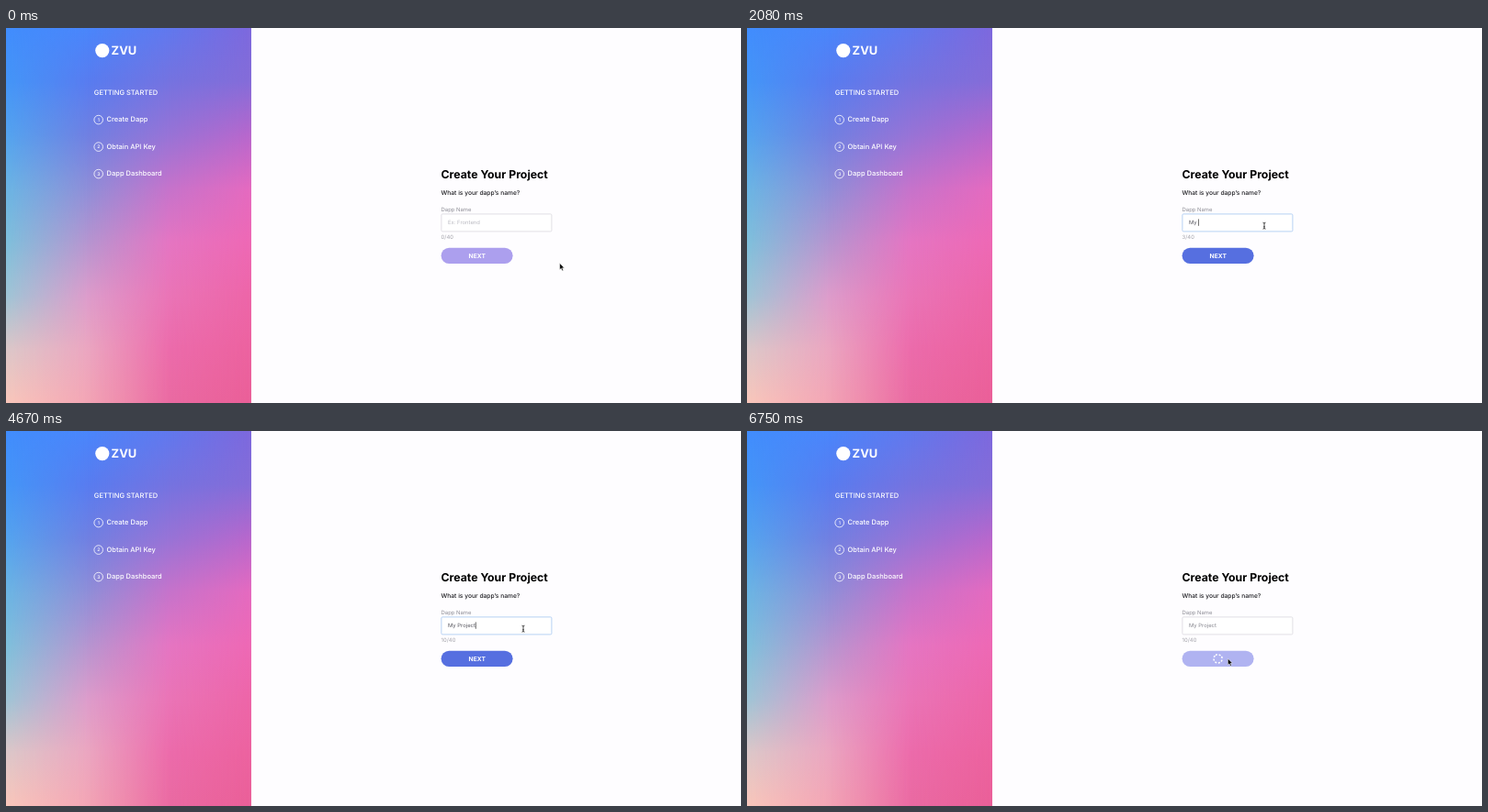
An HTML page for the animation above (6830 ms loop, 800 px wide and 409 px high).

```html
<!DOCTYPE html>
<html lang="en">
<head>
<meta charset="utf-8">
<title>Create Your Project</title>
<style>
  html, body { margin: 0; width: 100%; height: 100%; overflow: hidden; background: #fefdff; }
  #panel, #panel div, svg { position: absolute; left: 0; top: 0; }
  #panel { width: 266.6px; height: 409px; overflow: hidden; }
  #panel div { width: 267px; height: 409px; }
  svg { width: 800px; height: 409px; }
  text { font-family: Inter, Roboto, sans-serif; font-weight: 500; text-rendering: geometricPrecision; white-space: pre; }
  .nav { font-size: 7.5px; fill: #fff; }
  .small { font-size: 5.9px; fill: #8d8d95; font-weight: 400; }
  .bold { font-weight: 700; }
  .mid { text-anchor: middle; }
</style>
</head>
<body>
<div id="panel"></div>
<svg viewBox="0 0 800 409">
  <circle cx="104.8" cy="24.6" r="7.6" fill="#fff"/>
  <text class="bold" x="114.6" y="29" font-size="12.9" fill="#fff">ZVU</text>
  <text class="nav" x="95.8" y="73">GETTING STARTED</text>
  <g id="steps"></g>

  <text class="bold" x="473.4" y="163.9" font-size="12.3">Create Your Project</text>
  <text x="473.6" y="182.2" font-size="6.7" fill="#1c1c20">What is your dapp’s name?</text>
  <text class="small" x="473.6" y="199.5">Dapp Name</text>
  <rect id="field" x="473.9" y="202.9" width="120" height="19" rx="1.2" fill="#fff" stroke-width=".9"/>
  <text id="value" class="small" x="481" y="214.2"></text>
  <rect id="caret" y="208.4" width=".7" height="7.4" fill="#333"/>
  <text id="count" class="small" x="473.6" y="230.2" style="fill:#a3a3aa"></text>
  <rect id="button" x="473.6" y="239.7" width="78" height="17.3" rx="8.65"/>
  <text id="next" class="bold mid" x="512.7" y="250.7" font-size="6.7" fill="#fff">NEXT</text>
  <circle id="spinner" cx="512.6" cy="248.4" r="4.6" fill="none" stroke="#fff" stroke-width="1.5" stroke-dasharray="2 1.613"/>

  <g id="pointer">
    <path id="arrow" d="M0 0V7L1.6 5.6 2.7 8.1 3.9 7.6 2.8 5.1H5Z" stroke="#fff" stroke-width=".5"/>
    <path id="beam" d="M-1.5-3.4Q0-3.4 0-2.4Q0-3.4 1.5-3.4M0-2.6V2.8M-1.5 3.6Q0 3.6 0 2.6Q0 3.6 1.5 3.6M-.9 1.2H.9" fill="none" stroke="#222" stroke-width=".8"/>
    <path id="hand" d="M-.8.6Q0-.6.8.6V3L4 3.6Q4.8 4 4.5 5.5L3.8 8H.2L-2 5Q-2.4 3.8-.8 4.6Z" fill="#fff" stroke="#222" stroke-width=".7"/>
  </g>
</svg>
<script>
const LOOP = 6830, TICK = LOOP / 82;
const FOCUS = 1000, HOVER = 5480, CLICK = 5960;
const NAME = 'My Project';
const KEYS = [1660, 1830, 2000, 2170, 2500, 3160, 3740, 4080, 4250, 4500];
const $ = id => document.getElementById(id);
const set = (id, attrs) => { for (const k in attrs) $(id).setAttribute(k, attrs[k]); };
const show = (id, on) => set(id, { visibility: on ? 'visible' : 'hidden' });

// Side panel: vertical gradients, each fading in over the column to its left.
const columns = [
  '#418dfd, #4496f8, #54a4ef, #6bb5e4, #7fc0dc, #9fc5d6, #dcc8c9, #fac7bb',
  '#4a86fb, #587cf0, #7080e2, #8f8ed8, #b695d0, #dd9ccb, #eba6c0, #f3a5b5',
  '#6178ee, #7573e0, #9873d6, #c673cb, #e575c2, #ea74b6, #ec6bab, #ea6aa2',
  '#7d68dd, #856cd8, #b867cc, #e56abf, #ee68b4, #ed65a8, #ec629f, #ea5f98'
];
columns.forEach((stops, i) => {
  const div = document.createElement('div');
  div.style.background = `linear-gradient(${stops})`;
  if (i) div.style.maskImage = div.style.webkitMaskImage =
    `linear-gradient(to right, transparent ${i * 89 - 89}px, #000 ${i * 89}px)`;
  $('panel').append(div);
});

$('steps').innerHTML = ['Create Dapp', 'Obtain API Key', 'Dapp Dashboard'].map((label, i) => {
  const y = 100.1 + i * 29.5;
  return `<circle cx="100.7" cy="${y}" r="4.8" fill="none" stroke="#fff" stroke-width=".8"/>
    <text class="mid" x="100.7" y="${y + 1.8}" font-size="5" fill="#fff">${i + 1}</text>
    <text class="nav" x="109.6" y="${y + 2.3}">${label}</text>`;
}).join('');

const ramp = (t, from, to) => Math.min(1, Math.max(0, (t - from) / (to - from)));
const ease = p => p * p * (3 - 2 * p);
const mix = (a, b, p) => a.map((v, i) => v + (b[i] - v) * p);
const rgb = c => `rgb(${c.map(Math.round)})`;

const moves = [
  [150, 720, [563, 215.6]],
  [5120, 5560, [525.6, 247.2]],
  [5960, 6200, [523.4, 248.2]]
];
const fades = [
  [KEYS[0], KEYS[0] + 250, [86, 111, 224]],
  [HOVER, HOVER + 250, [132, 128, 232]],
  [CLICK, CLICK + 250, [176, 179, 241]]
];
const follow = (start, parts, t) =>
  parts.reduce((v, [from, to, end]) => mix(v, end, ease(ramp(t, from, to))), start);

function draw(t) {
  const typed = KEYS.filter(k => k <= t).length;
  const focused = t >= FOCUS && t < CLICK, loading = t >= CLICK;

  set('field', { stroke: focused ? '#afcdf2' : '#dedce2' });
  $('value').textContent = typed ? NAME.slice(0, typed) : 'Ex: Frontend';
  $('value').style.fill = !typed ? '#b9b9c0' : loading ? '#85858d' : '#55555e';
  $('count').textContent = typed + '/40';

  const since = t - (typed ? KEYS[typed - 1] : FOCUS);
  set('caret', { x: 481 + (typed ? $('value').getComputedTextLength() : 0) });
  show('caret', focused && since % 1000 < 500);

  set('button', { fill: rgb(follow([172, 159, 238], fades, t)) });
  show('next', !loading);
  show('spinner', loading);
  set('spinner', { transform: `rotate(${(t - CLICK) * .3} 512.6 248.4)` });

  const [x, y] = follow([602.7, 256.6], moves, t);
  const inField = x < 594 && y > 203 && y < 222;
  const inButton = x < 552 && y > 239.7 && !loading;
  set('pointer', { transform: `translate(${x} ${y})` });
  show('beam', inField);
  show('hand', inButton);
  show('arrow', !inField && !inButton);
}

const start = performance.now();
function frame() {
  const t = (performance.now() - start) % LOOP;
  draw(Math.floor((t + 4) / TICK) % 82 * TICK);
  requestAnimationFrame(frame);
}
frame();
</script>
</body>
</html>
```
